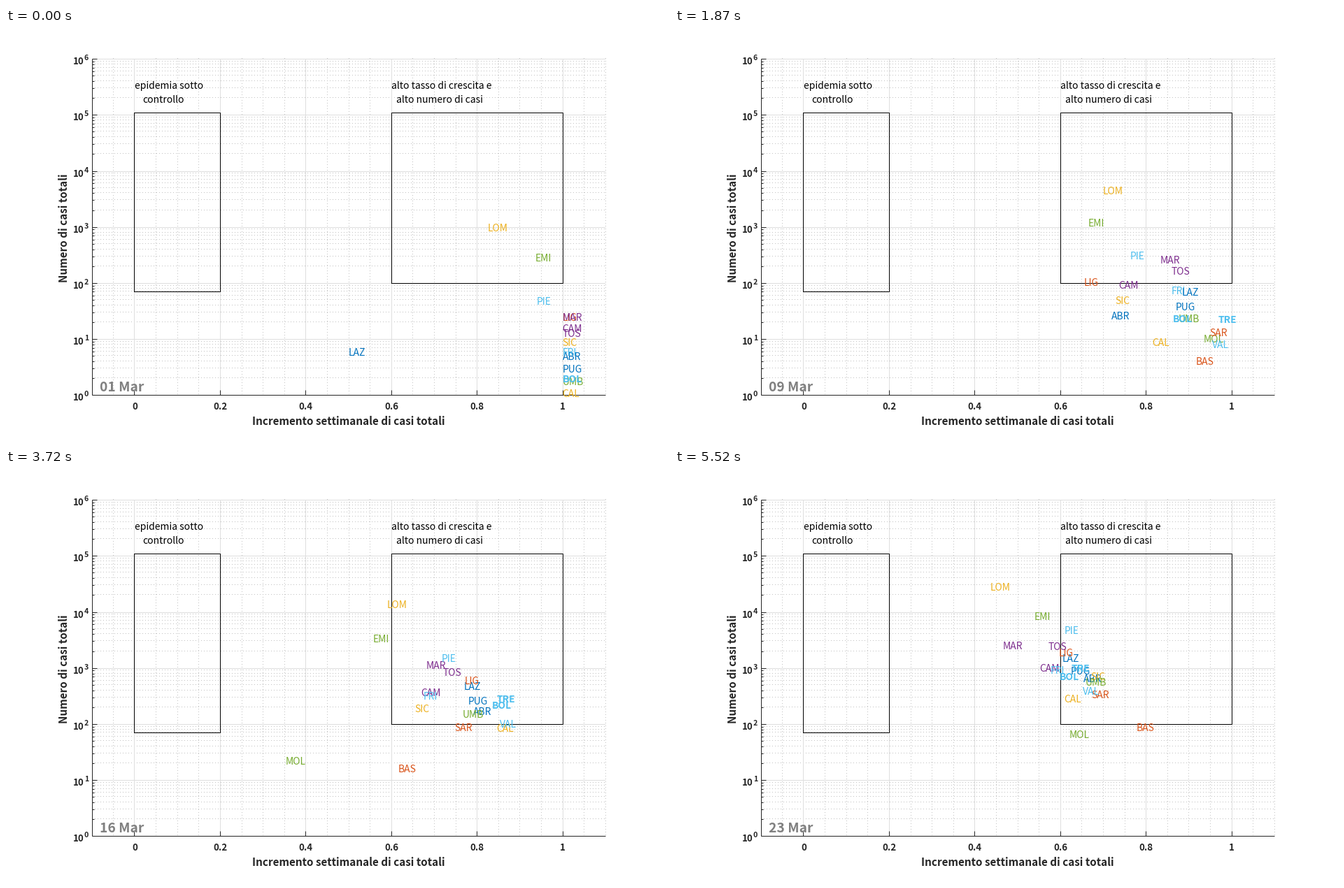
A matplotlib script that plays this animation: 948 by 591 pixels, repeating every 8.57 s.

```python
import math

import matplotlib.pyplot as plt
import numpy as np
from matplotlib.animation import FuncAnimation

WIDTH, HEIGHT, DPI = 948, 591, 64
PT = 72 / DPI                      # points per pixel
LOOP_MS, TICK_MS = 8570, 10
FIRST_MS, STEP_MS, STEPS = 70, 50, 110
STEPS_PER_DAY = 5
WINDOW = 6                         # days compared by the horizontal axis
KEY_DAYS = np.array([-6, 0, 9, 16, 22])    # counted from 1 March
INK = "#262626"
LEFT, RIGHT, TOP, BOTTOM = 123, 857, 44, 525
COLORS = ["#0072bd", "#d95319", "#edb120", "#7e2f8e", "#77ac30", "#4dbeee"]

plt.rcParams["font.family"] = ["Noto Sans CJK JP", "DejaVu Sans"]
fig = plt.figure(figsize=(WIDTH / DPI, HEIGHT / DPI), dpi=DPI, facecolor="white")
ax = fig.add_axes([0, 0, 1, 1])
ax.axis("off")
ax.set_autoscale_on(False)
ax.set_xlim(0, WIDTH)
ax.set_ylim(HEIGHT, 0)


def px(growth):
    return 183.46 + 612.25 * growth


def py(cases):
    return 525.4 - 80.22 * math.log10(cases)


def label(x, y, text, size=13.9, **style):
    return ax.text(x, y, text, fontsize=size * PT, va="baseline", **style)


def segments(draw, at, start, end, color):
    draw(at, start, end, colors=color, linewidth=PT)


def box(x0, x1, low, high):
    xs = [px(x0), px(x1), px(x1), px(x0), px(x0)]
    ys = [py(low), py(low), py(high), py(high), py(low)]
    ax.plot(xs, ys, color="black", lw=PT, solid_joinstyle="miter")


def dots(xs, ys):
    grid_x, grid_y = np.meshgrid(xs, ys)
    ax.plot(grid_x.ravel(), grid_y.ravel(), ",", color="#c2c2c2")


def draw_chart():
    major_x = [px(k / 5) for k in range(6)]
    major_y = [py(10.0 ** k) for k in range(7)]
    minor_x = [px(k / 20) for k in range(-1, 23) if k % 4]
    minor_y = [py(m * 10.0 ** k) for k in range(6) for m in range(2, 10)]

    dots(np.arange(LEFT, RIGHT + 1, 4), minor_y)
    dots(minor_x, np.arange(TOP, BOTTOM + 1, 4))
    segments(ax.vlines, major_x, TOP, BOTTOM, "#dedede")
    segments(ax.hlines, major_y, LEFT, RIGHT, "#dedede")

    segments(ax.vlines, [LEFT], TOP, BOTTOM, INK)
    segments(ax.hlines, [BOTTOM], LEFT, RIGHT, INK)
    segments(ax.vlines, major_x, BOTTOM - 7, BOTTOM, INK)
    segments(ax.hlines, major_y, LEFT, LEFT + 7, INK)
    segments(ax.hlines, minor_y, LEFT, LEFT + 3, INK)

    bold = dict(weight="bold", color=INK)
    for k, x in enumerate(major_x):
        label(x + 0.5, 546, f"{k / 5:g}", 13.3, ha="center", **bold)
    for k, y in enumerate(major_y):
        label(112, y + 8, "10", 13.3, ha="right", **bold)
        label(112, y + 2, str(k), 10.6, **bold)
    label(490, 568, "Incremento settimanale di casi totali", 15.2,
          ha="center", **bold)
    label(88, 286, "Numero di casi totali", 15.2, ha="center",
          rotation=90, rotation_mode="anchor", **bold)

    box(0, 0.2, 70, 1.1e5)
    box(0.6, 1, 100, 1.1e5)
    label(184, 87, "epidemia sotto")
    label(195, 107, "controllo")
    label(551.5, 87, "alto tasso di crescita e")
    label(558.5, 107, "alto numero di casi")


class Region:
    """A label that follows a smooth curve of total cases."""

    def __init__(self, name, color, totals, weight="normal"):
        # arcsinh acts like a logarithm that also accepts zero
        self.level = np.arcsinh(2 * np.array(totals))
        rise = np.diff(self.level) / np.diff(KEY_DAYS)
        inner = 2 * rise[:-1] * rise[1:] / (rise[:-1] + rise[1:])
        self.slope = np.concatenate([rise[:1], inner, rise[-1:]])
        self.text = label(0, 0, name, color=color, weight=weight)

    def cases(self, day):
        """Monotone cubic through the key points."""
        i = min(int(np.searchsorted(KEY_DAYS, day, "right")), len(KEY_DAYS) - 1) - 1
        span = KEY_DAYS[i + 1] - KEY_DAYS[i]
        s = (day - KEY_DAYS[i]) / span
        ease = s * s * (3 - 2 * s)
        level = self.level[i] + (self.level[i + 1] - self.level[i]) * ease
        level += span * s * (1 - s) * (self.slope[i] * (1 - s) - self.slope[i + 1] * s)
        return math.sinh(level) / 2

    def move(self, day):
        total = self.cases(day)
        visible = total > 0.85
        self.text.set_visible(visible)
        if visible:
            growth = 1 - self.cases(day - WINDOW) / total
            self.text.set_position((px(growth), py(total) + 6))


draw_chart()
regions = []


def region(name, *totals, seed=0):
    color = COLORS[len(regions) % len(COLORS)]
    regions.append(Region(name, color, [seed, *totals]))


def province(name, *totals):
    regions.append(Region(name, COLORS[-1], [0, *totals], "bold"))


# Totals on the key days; seed is the total before the first day shown
region("ABR", 5, 38, 228, 660)
region("BAS", 0.2, 6.5, 20, 90)
region("CAL", 1.1, 14, 114, 291)
region("CAM", 16, 130, 457, 1020)
region("EMI", 285, 1540, 3930, 8535, seed=18)
region("FRI", 6, 111, 394, 930)
region("LAZ", 6, 117, 607, 1535, seed=3)
region("LIG", 25, 145, 778, 1924)
region("LOM", 984, 5950, 16220, 28760, seed=172)
region("MAR", 25, 386, 1371, 2569)
region("MOL", 0.4, 15, 25, 66)
region("PIE", 49, 451, 1900, 4860, seed=3)
region("PUG", 3, 62, 340, 906)
region("SAR", 0.4, 24, 114, 348)
region("SIC", 9, 69, 237, 721)
region("TOS", 13, 252, 1053, 2461)
region("UMB", 1.8, 38, 197, 576)
region("VAL", 0.2, 16, 136, 392)
province("BOL", 2, 39, 291, 724)
province("TRE", 0.4, 48, 378, 1010)

date = label(134.5, 520, "", 19.2, weight="bold", color="#808080")


def update(frame):
    elapsed = frame * TICK_MS - FIRST_MS
    step = min(max(elapsed // STEP_MS + 1, 0), STEPS)
    day = step / STEPS_PER_DAY
    for item in regions:
        item.move(day)
    # Daily figures are dated 18:00, so the date turns a quarter day later
    date.set_text(f"{1 + math.floor(day + 0.75):02d} Mar")
    return [item.text for item in regions] + [date]


animation = FuncAnimation(fig, update, frames=LOOP_MS // TICK_MS,
                          interval=TICK_MS, repeat=True, repeat_delay=0)
plt.show()
```
